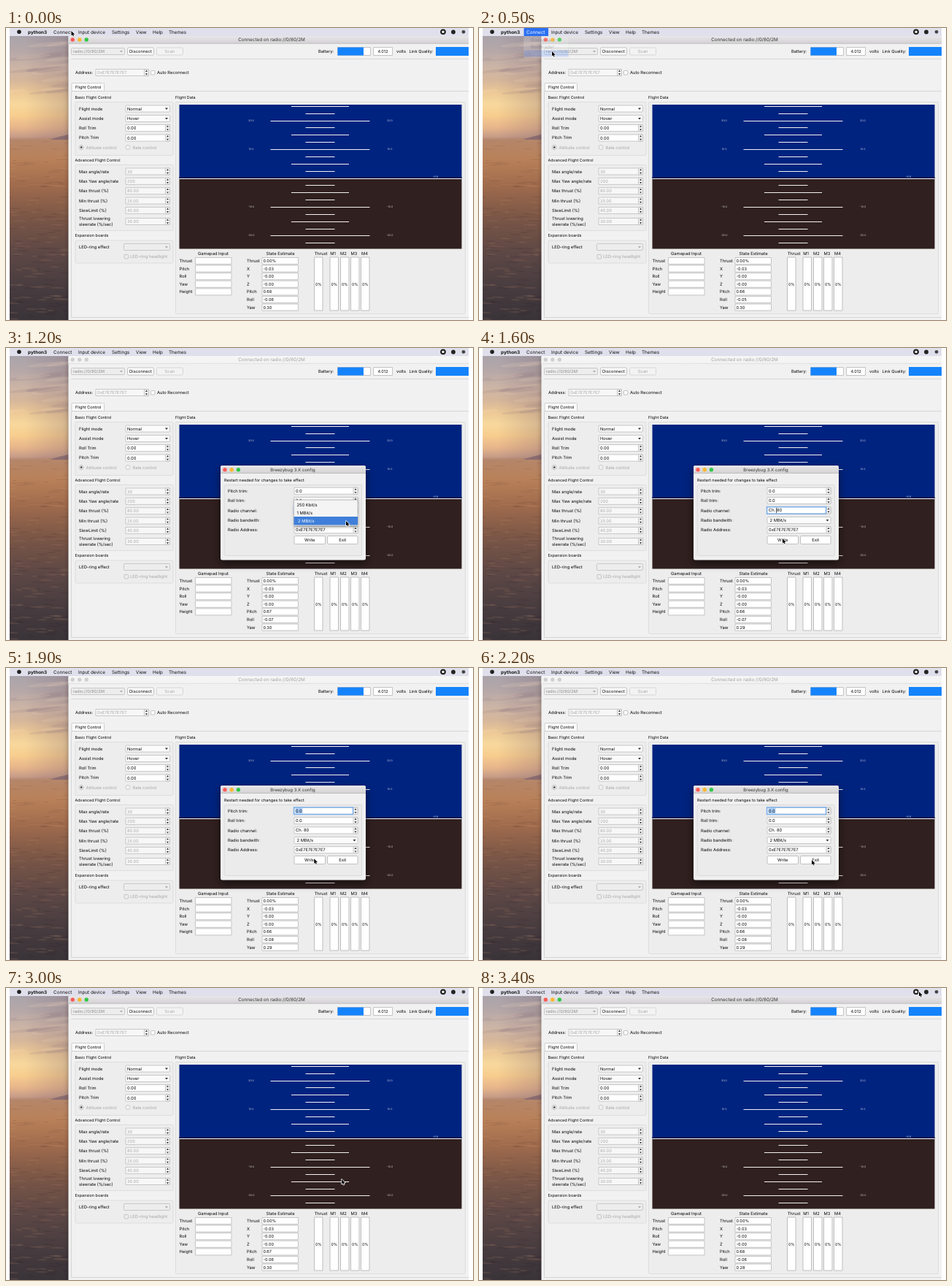
These frames come from a looping animation (640x400 px, 3.5 s). An HTML page with a canvas:

```html
<!DOCTYPE html>
<html lang="en">
<head>
<meta charset="utf-8">
<title>Radio config</title>
<style>
html, body { margin: 0; width: 100%; height: 100%; overflow: hidden; background: #fff; }
canvas { display: block; width: 640px; height: 400px; }
</style>
</head>
<body>
<canvas id="stage" width="640" height="400"></canvas>
<script>
const ctx = document.getElementById('stage').getContext('2d');
ctx.textRendering = 'geometricPrecision';
const LOOP = 3500, STEP = 100;
const FONT = 'Inter, Roboto, sans-serif';
const INK = '#050505', GREY = '#a6a6a6', EDGE = '#c4c4c4', BLUE = '#1583fb';
const DIALOG_OPEN = 700, DIALOG_CLOSE = 2500;

// time, x, y of the pointer tip
const POINTER = [
  [0, 89.5, 4], [200, 92, 16], [500, 100, 32], [600, 104, 36], [900, 425, 219],
  [1000, 462, 232], [1200, 466, 237], [1300, 466, 237], [1600, 416, 261],
  [1800, 416, 261], [2200, 456, 263], [3000, 460, 262], [3400, 603, 5]
];
// time, pitch, roll, yaw
const ATTITUDE = [
  [0, .68, -.06, .30], [500, .66, -.05, .30], [1200, .67, -.07, .30], [1600, .66, -.07, .29],
  [2200, .66, -.08, .29], [3000, .67, -.06, .30], [3400, .68, -.06, .28]
];

function sample(keys, t) {
  let i = 0;
  while (i < keys.length - 2 && t >= keys[i + 1][0]) i++;
  const a = keys[i], b = keys[i + 1];
  const u = Math.min(1, (t - a[0]) / (b[0] - a[0]));
  const e = u * u * (3 - 2 * u);
  return a.slice(1).map((v, k) => v + (b[k + 1] - v) * e);
}

function rect(x, y, w, h, fill) {
  ctx.fillStyle = fill;
  ctx.fillRect(x, y, w, h);
}

function box(x, y, w, h, fill, edge = EDGE, r = 0) {
  ctx.beginPath();
  ctx.roundRect(x + .5, y + .5, w - 1, h - 1, r);
  ctx.fillStyle = fill;
  ctx.fill();
  ctx.strokeStyle = edge;
  ctx.lineWidth = .8;
  ctx.stroke();
}

function dot(x, y, r, fill, edge) {
  ctx.beginPath();
  ctx.arc(x, y, r, 0, Math.PI * 2);
  ctx.fillStyle = fill;
  ctx.fill();
  if (edge) {
    ctx.strokeStyle = edge;
    ctx.lineWidth = .7;
    ctx.stroke();
  }
}

// y is the middle of the capitals
function text(s, x, y, color = INK, size = 5.8, align = 'left', weight = 400) {
  ctx.font = `${weight} ${size}px ${FONT}`;
  ctx.textAlign = align;
  ctx.fillStyle = color;
  ctx.fillText(s, x, y + size * .36);
}

function tri(x, y, w, h, color) {
  ctx.beginPath();
  ctx.moveTo(x - w, y);
  ctx.lineTo(x + w, y);
  ctx.lineTo(x, y + h);
  ctx.fillStyle = color;
  ctx.fill();
}

function spin(s, x, y, w, on = true) {
  box(x, y - 5, w, 10, on ? '#fff' : '#f7f7f7', '#bdbdbd');
  text(s, x + 2.5, y, on ? INK : GREY);
  box(x + w - 7, y - 5, 7, 10, '#f8f8f8', '#b8b8b8', 1.5);
  tri(x + w - 3.5, y - 1.2, 1.6, -2.2, '#333');
  tri(x + w - 3.5, y + 1.2, 1.6, 2.2, '#333');
}

function combo(s, x, y, w, on = true, pad = 2.5) {
  box(x, y - 5, w, 10, on ? '#fbfbfb' : '#ededed', '#bdbdbd', 1);
  text(s, x + pad, y, on ? INK : '#8c8c8c');
  tri(x + w - 5, y - 1, 2, 2.4, on ? '#333' : '#aaa');
}

function button(s, x, y, w, h, on = true) {
  box(x, y, w, h, on ? '#fff' : '#f3f3f3', on ? '#b4b4b4' : '#cfcfcf', 1.5);
  text(s, x + w / 2, y + h / 2, on ? INK : GREY, 5.8, 'center');
}

function lights(x, y, gap, on) {
  const colors = on ? ['#fc5b57', '#f9b92e', '#33c748'] : ['#d0d0d0', '#d0d0d0', '#d0d0d0'];
  colors.forEach((c, i) => dot(x + i * gap, y, 2.7, c));
}

function titleBar(x, y, w, h, on) {
  const g = ctx.createLinearGradient(0, y, 0, y + h);
  g.addColorStop(0, on ? '#e8e6e8' : '#f6f6f6');
  g.addColorStop(1, on ? '#d3d1d3' : '#f3f3f3');
  rect(x, y, w, h, g);
  rect(x, y + h - .7, w, .7, on ? '#b8b8b8' : '#d6d6d6');
}

function desktop() {
  const g = ctx.createLinearGradient(0, 0, 0, 400);
  [[11, '#aaa4ab'], [32, '#b6a8a8'], [55, '#cdb5a5'], [72, '#d6b79b'], [88, '#ecc896'],
   [104, '#f8d89d'], [120, '#f8cd8e'], [137, '#e6b48a'], [149, '#c69c88'], [153, '#b4866a'],
   [180, '#b98159'], [215, '#a06b4d'], [260, '#7a5646'], [310, '#5c4745'], [360, '#463b3f'],
   [400, '#393338']].forEach(([y, c]) => g.addColorStop(y / 400, c));
  rect(5, 11, 81, 389, g);
  ctx.save();
  ctx.beginPath();
  ctx.rect(5, 11, 81, 389);
  ctx.clip();
  const shade = ctx.createLinearGradient(25, 0, 86, 0);
  shade.addColorStop(0, 'rgba(120,95,110,0)');
  shade.addColorStop(1, 'rgba(120,95,110,.28)');
  rect(5, 11, 81, 141, shade);
  let seed = 7;
  const rnd = () => (seed = seed * 16807 % 2147483647) / 2147483647;
  for (let i = 0; i < 18; i++) {
    ctx.beginPath();
    ctx.ellipse(5 + rnd() * 80, 18 + rnd() * 75, 14 + rnd() * 26, 1.5 + rnd() * 3, -.1, 0, 7);
    ctx.fillStyle = i % 2 ? 'rgba(125,108,120,.14)' : 'rgba(255,225,190,.14)';
    ctx.fill();
  }
  for (let i = 0; i < 150; i++) {
    const d = rnd();
    ctx.beginPath();
    ctx.ellipse(5 + rnd() * 80, 155 + d * 245, 3 + rnd() * 9, .4 + d * .9, .03, 0, 7);
    ctx.fillStyle = i % 2 ? 'rgba(45,32,36,.13)' : 'rgba(235,175,130,.11)';
    ctx.fill();
  }
  ctx.beginPath();
  ctx.moveTo(60, 153);
  ctx.quadraticCurveTo(74, 148, 86, 146);
  ctx.lineTo(86, 153);
  ctx.fillStyle = '#8a6c70';
  ctx.fill();
  ctx.restore();
}

function menuBar(t) {
  rect(5, 0, 629, 11, '#e0e0ec');
  const open = t >= 100 && t < 600;
  if (open) rect(61.5, 0, 33.5, 11, '#2a70f2');
  dot(18, 5.3, 2.8, '#222');
  text('python3', 30, 5.4, '#111', 6.4, 'left', 700);
  [['Connect', 65], ['Input device', 99], ['Settings', 145], ['View', 178], ['Help', 201], ['Themes', 223]]
    .forEach(([s, x], i) => text(s, x, 5.4, open && !i ? '#fff' : '#111', 6.35));
  dot(599, 5.3, 3.8, '#151515');
  rect(597.4, 3.7, 3.2, 3.2, '#eee');
  dot(613, 5.5, 2.9, '#222');
  dot(627, 5.3, 2.4, '#444');
}

function dropDown(t) {
  if (t < 100 || t >= 600) return;
  ctx.save();
  ctx.globalAlpha = t < 500 ? 1 : .2;
  box(61, 11, 62, 30, '#f3f3f3', '#cfcfcf', 1);
  const hit = t < 200 ? -1 : Math.min(2, Math.floor((sample(POINTER, t)[1] - 11) / 9.6));
  ['Disconnect', 'Bootloader', 'Configure 2.X'].forEach((s, i) => {
    const y = 16.5 + i * 9.2;
    if (i === hit) rect(61.5, y - 4.4, 61, 8.8, '#2a70f2');
    text(s, 71, y, i === hit ? '#fff' : INK, 6.2);
  });
  ctx.restore();
}

function horizon() {
  rect(237.5, 105, 387, 101, '#002380');
  rect(237.5, 206, 387, 96.5, '#30201f');
  rect(237.5, 204, 387, 2, '#001250');
  for (let n = -9; n <= 10; n++) {
    if (!n) continue;
    const y = Math.round(205.5 - n * 9.86);
    const major = n % 4 === 0;
    const half = major ? 68 : n % 2 ? 20 : 39.5;
    rect(430.5 - half, y, half * 2, 1, '#f2f2f2');
    if (major) {
      const s = (n * 2.5).toFixed(1);
      text(s, 336, y - .5, '#d8d8e0', 3.5, 'center');
      text(s, 526, y - .5, '#d8d8e0', 3.5, 'center');
    }
  }
  rect(237.5, 206, 387, 1, '#f4f6ff');
  text('-0.0', 588.5, 203.6, '#f0f0f0', 3.7, 'center');
}

function toolbar() {
  combo('radio://0/80/2M', 89, 32, 74, false);
  button('Disconnect', 166, 26.5, 37, 11);
  button('Scan', 206, 26.5, 37, 11, false);
  text('Battery:', 428, 32);
  box(454, 26, 46, 12, '#fff', '#b5b5b5');
  rect(454.5, 26.5, 35.5, 11, BLUE);
  box(503, 26, 27, 12, '#fff', '#b5b5b5');
  text('4.012', 516.5, 32, INK, 5.6, 'center');
  text('volts', 535, 32);
  text('Link Quality:', 552.5, 32, INK, 5.7);
  rect(589, 26, 45, 12, BLUE);
  rect(89, 42, 545, .8, '#d2d2d2');
  text('Address:', 95, 61);
  spin('0xE7E7E7E7E7', 122.5, 61, 73.5, false);
  box(198, 58, 6.5, 6.5, '#fff', '#b0b0b0', 1);
  text('Auto Reconnect', 207, 61);
}

function group(title, x, y, w, h) {
  text(title, x, y - 6, INK, 5.45);
  box(x, y, w, h, '#ededed', '#d9d9d9', 1.5);
}

function leftPanel() {
  group('Basic Flight Control', 94.5, 101, 135, 74);
  ['Flight mode', 'Assist mode', 'Roll Trim', 'Pitch Trim']
    .forEach((s, i) => text(s, 100, 110.5 + i * 13.3));
  combo('Normal', 163.5, 110.5, 61.5);
  combo('Hover', 163.5, 124, 61.5);
  spin('0.00', 163.5, 137, 61.5);
  spin('0.00', 163.5, 150.5, 61.5);
  dot(103.2, 163.5, 3, '#f2f2f2', '#aaa');
  dot(103.2, 163.5, 1.4, '#555');
  text('Attitude control', 109.5, 163.5, GREY);
  dot(167, 163.5, 3, '#f2f2f2', '#b8b8b8');
  text('Rate control', 173.5, 163.5, GREY);

  group('Advanced Flight Control', 94.5, 187, 135, 91);
  [['Max angle/rate', '30'], ['Max Yaw angle/rate', '200'], ['Max thrust (%)', '80.00'],
   ['Min thrust (%)', '25.00'], ['SlewLimit (%)', '45.00']].forEach(([s, v], i) => {
    text(s, 100, 196.5 + i * 13.35);
    spin(v, 163.5, 196.5 + i * 13.35, 61.5, false);
  });
  text('Thrust lowering', 100, 261.3);
  text('slewrate (%/sec)', 100, 268.5);
  spin('30.00', 163.5, 265, 61.5, false);

  group('Expansion boards', 94.5, 290.5, 135, 32);
  text('LED-ring effect', 100, 300);
  combo('', 161, 300, 64, false);
  box(161.5, 310, 6.5, 6.5, '#ededed', '#b8b8b8', 1);
  text('LED-ring headlight', 170, 313.3, GREY);
}

function readouts(t) {
  const row = i => 319 + i * 10.6;
  const field = (s, x, i) => {
    box(x, row(i) - 5, 50.5, 10, '#fff', '#b9b9b9');
    if (s) text(s, x + 2, row(i), INK, 5.6);
  };
  text('Gamepad Input', 284, 309, INK, 5.8, 'center');
  ['Thrust', 'Pitch', 'Roll', 'Yaw', 'Height'].forEach((s, i) => {
    text(s, 237.5, row(i));
    field('', 259, i);
  });
  const [pitch, roll, yaw] = sample(ATTITUDE, t).map(v => v.toFixed(2));
  text('State Estimate', 376, 309, INK, 5.8, 'center');
  [['Thrust', '0.00%'], ['X', '-0.03'], ['Y', '-0.00'], ['Z', '-0.00'],
   ['Pitch', pitch], ['Roll', roll], ['Yaw', yaw]].forEach(([s, v], i) => {
    text(s, 330, row(i));
    field(v, 350.5, i);
  });
  [['Thrust', 422, 431.5], ['M1', 443.5, 448], ['M2', 458, 462.5], ['M3', 472, 477], ['M4', 486, 491.5]]
    .forEach(([s, x, cx]) => {
      text(s, cx, 309, INK, 5.8, 'center');
      box(x, 313.5, 12.5, 74, '#fff', '#b0b0b0');
      text('0%', x + 6.2, 351, INK, 5.2, 'center');
    });
}

function mainWindow(t, active) {
  ctx.save();
  ctx.shadowColor = 'rgba(0,0,0,.45)';
  ctx.shadowBlur = 7;
  rect(85.5, 12, 549, 400, '#f1f1f1');
  ctx.restore();
  titleBar(85.5, 11, 549, 10.5, active);
  lights(91.3, 16, 9.5, active);
  text('Connected on radio://0/80/2M', 364, 16, active ? '#333' : '#a0a0a0', 6.35, 'center');
  toolbar();
  box(89, 86, 560, 311, '#f1f1f1', '#cfcfcf');
  box(89.5, 75, 45.5, 12, '#fcfcfc', '#c4c4c4', 1);
  text('Flight Control', 95, 81, INK, 5.6);
  leftPanel();
  group('Flight Data', 232, 101, 398, 291);
  horizon();
  readouts(t);
}

function focusRing(y) {
  ctx.strokeStyle = '#7fb2ee';
  ctx.lineWidth = 1.5;
  ctx.strokeRect(394.5, y - 4.8, 81, 9.6);
}

function dialog(t) {
  ctx.save();
  ctx.shadowColor = 'rgba(0,0,0,.55)';
  ctx.shadowBlur = 12;
  ctx.shadowOffsetY = 4;
  ctx.beginPath();
  ctx.roundRect(294, 161, 199, 129.5, 2.5);
  ctx.fillStyle = '#f0f0f0';
  ctx.fill();
  ctx.restore();
  ctx.save();
  ctx.beginPath();
  ctx.roundRect(294, 161, 199, 129.5, 2.5);
  ctx.clip();
  titleBar(294, 161, 199, 11, true);
  ctx.restore();
  lights(300, 166.7, 9.2, true);
  text('Breezybug 3.X config', 393, 166.8, '#333', 6, 'center');
  text('Restart needed for changes to take effect', 299, 180.5, INK, 5.6);
  box(298.5, 187, 189.5, 98, '#ebebeb', '#d6d6d6', 1.5);
  ['Pitch trim:', 'Roll trim:', 'Radio channel:', 'Radio bandwith:', 'Radio Address:']
    .forEach((s, i) => text(s, 304, 195.7 + i * 13.4));
  spin('0.0', 394.5, 195.7, 88);
  spin('0.0', 394.5, 209, 88);
  spin('Ch. 80', 394.5, 222.4, 88);
  combo('2 MBit/s', 394.5, 236, 88, true, 4);
  spin('0xE7E7E7E7E7', 394.5, 249.2, 88);
  button('Write', 394.5, 257, 43.5, 12);
  button('Exit', 440, 257, 42.5, 12);

  if (t >= 900 && t < 1700) {
    focusRing(222.4);
    rect(407.3, 218.8, .8, 7.2, '#222');
  } else {
    focusRing(195.7);
    rect(396.5, 192, 10, 7.4, '#a9cdf8');
    text('0.0', 397, 195.7);
  }
  if (t >= 1000 && t < 1300) popup();
}

function popup() {
  ctx.save();
  ctx.shadowColor = 'rgba(0,0,0,.35)';
  ctx.shadowBlur = 4;
  ctx.shadowOffsetY = 1;
  rect(394.5, 208, 87.5, 35.5, '#f4f4f4');
  ctx.restore();
  box(394, 207.7, 88.5, 36, '#f4f4f4', '#b9b9b9');
  rect(394.5, 231, 87.5, 11.5, '#3f7fd9');
  text('250 Kbit/s', 398.5, 214.7);
  text('1 MBit/s', 398.5, 225.7);
  text('2 MBit/s', 400, 236.7, '#fff');
}

function pointer(t) {
  const [x, y] = sample(POINTER, t);
  ctx.save();
  ctx.translate(x, y);
  ctx.beginPath();
  [[0, 0], [0, 6.6], [1.5, 5.3], [2.5, 7.6], [3.6, 7.1], [2.6, 4.9], [4.7, 4.8]]
    .forEach(p => ctx.lineTo(...p));
  ctx.closePath();
  ctx.lineJoin = 'round';
  ctx.lineWidth = 1.4;
  ctx.strokeStyle = '#fff';
  ctx.stroke();
  ctx.fillStyle = '#000';
  ctx.fill();
  ctx.restore();
}

function draw(t) {
  const modal = t >= DIALOG_OPEN && t < DIALOG_CLOSE;
  rect(0, 0, 640, 400, '#fff');
  ctx.save();
  ctx.beginPath();
  ctx.rect(5, 0, 629, 400);
  ctx.clip();
  desktop();
  mainWindow(t, !modal);
  menuBar(t);
  dropDown(t);
  if (modal) dialog(t);
  pointer(t);
  ctx.restore();
}

const start = performance.now();
function tick() {
  const t = (performance.now() - start) % LOOP;
  draw(Math.floor(t / STEP) * STEP);
  requestAnimationFrame(tick);
}
tick();
</script>
</body>
</html>
```
